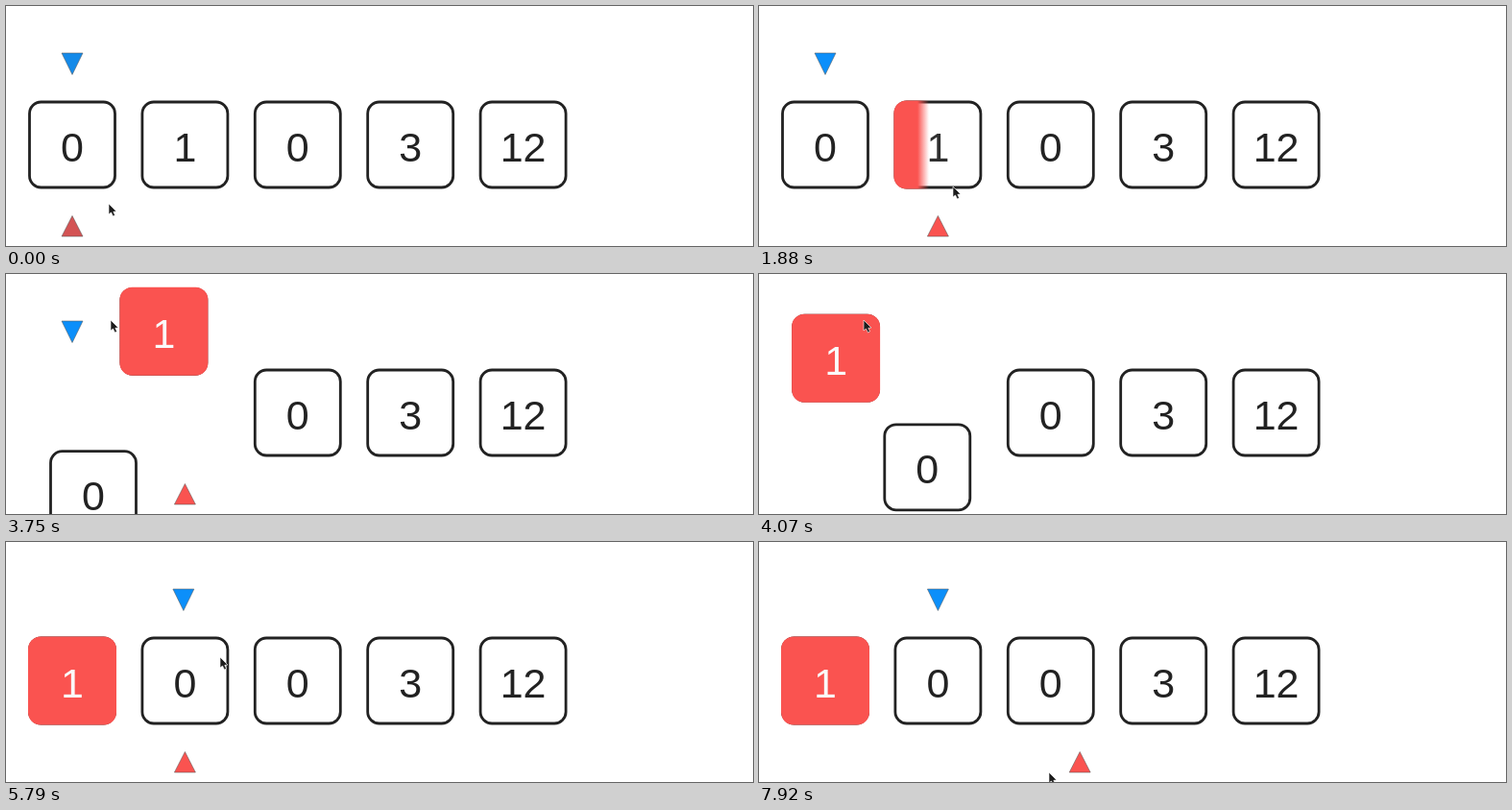
An HTML page with a canvas that plays this animation: 778 by 250 pixels, repeating every 7.99 s.

```html
<!DOCTYPE html>
<html lang="en">
<head>
<meta charset="utf-8">
<title>Two pointers</title>
<style>
html, body { margin: 0; width: 100%; height: 100%; overflow: hidden; background: #fff; }
canvas { display: block; width: 778px; height: 250px; }
</style>
</head>
<body>
<canvas id="stage" width="778" height="250"></canvas>
<script>
const ctx = document.getElementById('stage').getContext('2d');
const LOOP = 7990, FIRST = 69, GAP = 117.4, ROW = 144.5;
const RED = '#fa5350', INK = '#222';

// Mouse path: time, x, y
const mouse = [
  [70, 107, 206], [560, 184, 236], [1250, 187, 238], [1490, 187, 238],
  [1880, 202, 188], [2270, 203, 176], [2430, 185, 142], [2670, 185, 142],
  [2810, 112, 18], [2890, 96, 37], [3130, 97, 38], [3280, 97, 38],
  [3600, 109, 48], [4070, 109, 48], [4530, 142, 52], [4690, 142, 52],
  [5230, 186, 58], [5480, 190, 64], [5790, 223, 120], [6260, 286, 236],
  [6420, 286, 236], [7210, 302, 240]
];

const clamp = v => Math.max(0, Math.min(1, v));
const ease = v => { v = clamp(v); return v * v * (3 - 2 * v); };
const mix = (a, b, p) => a + (b - a) * p;
const slot = i => FIRST + i * GAP;

// Damped spring from 0 to 1, dt in ms
const spring = dt => dt <= 0 ? 0 : dt > 700 ? 1
  : 1 - Math.exp(-0.0065 * dt) * Math.cos(Math.PI * dt / 200);

function mouseAt(t) {
  const i = mouse.findIndex(k => k[0] > t);
  if (i === 0) return mouse[0].slice(1);
  if (i < 0) return mouse[mouse.length - 1].slice(1);
  const a = mouse[i - 1], b = mouse[i], p = ease((t - a[0]) / (b[0] - a[0]));
  return [mix(a[1], b[1], p), mix(a[2], b[2], p)];
}

function poly(points, fill, stroke) {
  ctx.beginPath();
  points.forEach(([x, y]) => ctx.lineTo(x, y));
  ctx.closePath();
  ctx.fillStyle = fill;
  ctx.strokeStyle = stroke;
  ctx.lineWidth = 1;
  ctx.fill();
  ctx.stroke();
}

function marker(x, base, tip, color) {
  poly([[x - 11, base], [x + 11, base], [x, tip]], color, 'rgba(90,90,90,.55)');
}

function cell(label, x, y, fill = 0) {
  const left = x - 46, top = y - 46;
  ctx.beginPath();
  ctx.roundRect(left + 1.5, top + 1.5, 89, 89, 12);
  ctx.fillStyle = '#fff';
  ctx.fill();
  ctx.strokeStyle = INK;
  ctx.lineWidth = 2.8;
  ctx.stroke();
  if (fill > 0) {
    const edge = left + mix(-7, 99, fill);
    const g = ctx.createLinearGradient(edge - 6, 0, edge + 6, 0);
    g.addColorStop(0, RED);
    g.addColorStop(1, 'rgba(250,83,80,0)');
    ctx.beginPath();
    ctx.roundRect(left, top, 92, 92, 13);
    ctx.fillStyle = g;
    ctx.fill();
  }
  const c = mix(34, 250, ease((fill - 0.25) / 0.7));
  ctx.fillStyle = `rgb(${c},${c},${c})`;
  ctx.fillText(label, x, y + 17);
}

function draw(t) {
  ctx.clearRect(0, 0, 778, 250);
  ctx.font = '43px "Liberation Sans", Arial, sans-serif';
  ctx.textAlign = 'center';

  const fresh = ease((t - 70) / 600);
  const red = slot(spring(t - 650) + spring(t - 7714));
  const blue = slot(spring(t - 5310));
  marker(blue, 49, 71.5, `rgb(${mix(20, 12, fresh)},${mix(138, 143, fresh)},${mix(233, 250, fresh)})`);
  marker(red, 240, 218.5, `rgb(${mix(211, 250, fresh)},83,${mix(84, 80, fresh)})`);

  // The first two cells trade places, one over and one under the row
  const swap = ease((t - 3585) / 600);
  const lift = 100 * (1 - (1 - 2 * swap) ** 4);
  cell('0', slot(swap), ROW + lift);
  cell('1', slot(1 - swap), ROW - lift, ease((t - 1680) / 500));
  ['0', '3', '12'].forEach((s, i) => cell(s, slot(i + 2), ROW));

  const [x, y] = mouseAt(t);
  const arrow = [[0, 0], [0, 11], [2.5, 9], [4.5, 13], [6.5, 12], [4.8, 8.3], [8, 8]];
  poly(arrow.map(([a, b]) => [x + a, y + b]), '#1c1c1c', 'rgba(255,255,255,.6)');
}

function frame() {
  draw(performance.now() % LOOP);
  requestAnimationFrame(frame);
}
frame();
</script>
</body>
</html>
```
